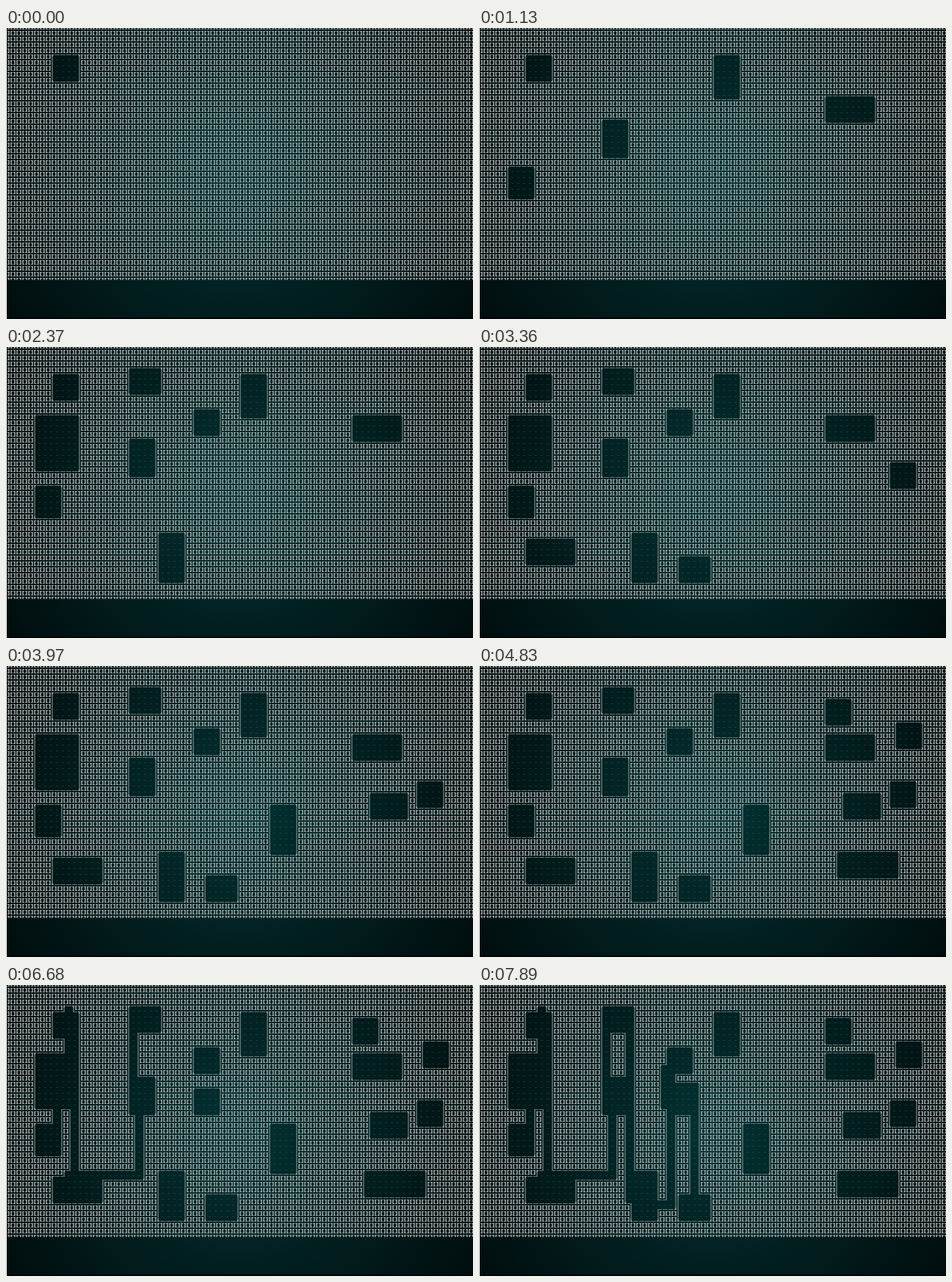
An HTML page with a canvas that plays this animation: 636 px wide and 396 px high, repeating every 8 s.

```html
<!DOCTYPE html>
<html lang="en">
<head>
<meta charset="utf-8">
<title>Dungeon digger</title>
<style>
html, body { margin: 0; width: 100%; height: 100%; overflow: hidden; background: #000508; }
canvas { display: block; }
</style>
</head>
<body>
<canvas id="stage" width="636" height="396"></canvas>
<script>
const ctx = document.getElementById('stage').getContext('2d');
const LOOP = 8000, FIRST = 208, STEP = 307.2;
const COLS = 80, ROWS = 43, CELL = 8, LEFT = 2, TOP = -1;

function room(x, y, w = 4, h = 4) {
  return Array.from({ length: w * h }, (_, i) => [x + i % w, y + Math.floor(i / w)]);
}

// A corridor runs along column x from y1 to y2, then turns towards column x2.
function corridor(x, y1, y2, x2 = x) {
  const cells = [];
  const dy = Math.sign(y2 - y1), dx = Math.sign(x2 - x);
  for (let y = y1; y !== y2; y += dy) cells.push([x, y]);
  for (; x !== x2; x += dx) cells.push([x, y2]);
  return [...cells, [x2, y2]];
}

// One area is dug per step.
const areas = [
  room(8, 5), room(21, 16, 4, 6), room(40, 5, 4, 7), room(59, 12, 8),
  room(5, 24, 4, 5), room(26, 32, 4, 8), room(21, 4, 5), room(5, 12, 7, 9),
  room(32, 11), room(34, 36, 5), room(70, 20), room(8, 33, 8),
  room(45, 24, 4, 8), room(62, 22, 6), room(61, 32, 10), room(59, 6),
  room(71, 10), room(32, 18),
  corridor(8, 21, 23), corridor(10, 4, 11), corridor(11, 9, 32),
  corridor(22, 22, 32, 10), corridor(21, 8, 15), corridor(25, 8, 36),
  corridor(32, 15, 37, 30), corridor(31, 14, 20), corridor(36, 35, 17, 33)
];

function radial(...colors) {
  const g = ctx.createRadialGradient(318, 196, 0, 318, 196, 375);
  colors.forEach((color, i) => g.addColorStop(i / (colors.length - 1), color));
  return g;
}
const ground = radial('#033233', '#021f20', '#010d0d');
const arm = radial('#94a5a6', '#a2a6a5', '#a5a5a5');
const line = radial('#5f7878', '#647371', '#666f6d');

function bar(x, y, w, h, color) {
  ctx.fillStyle = color;
  ctx.fillRect(x, y, w, h);
}

// Double-line box glyph: a line with a neighbour on its side splits into two arms.
function glyph(x, y, n, e, s, w) {
  const upright = (dx, split) => {
    const a = n ? 0 : 2, b = s ? CELL : 6;
    if (!split) return bar(x + dx, y + a, 1.5, b - a, line);
    if (n) bar(x + dx, y, 1.5, 3, arm);
    if (s) bar(x + dx, y + 5, 1.5, 3, arm);
  };
  const level = (dy, split) => {
    const a = w ? 0 : 1.2, b = e ? 7 : 5.8;
    if (!split) return bar(x + a, y + dy, b - a, 1, line);
    if (w) bar(x, y + dy, 2.7, 1, arm);
    if (e) bar(x + 4.3, y + dy, 2.7, 1, arm);
  };
  upright(1.2, w);
  upright(4.3, e);
  level(2, n);
  level(5, s);
}

function draw(count) {
  const key = (c, r) => r * COLS + c;
  const open = new Set(areas.slice(0, count).flat().map(([c, r]) => key(c, r)));
  const solid = (c, r) => !open.has(key(c, r));

  bar(0, 0, 636, 396, '#000508');
  bar(0, 0, 636, 394, ground);
  bar(0, 0, 1, 396, '#fff');

  for (let r = 0; r < ROWS; r++) {
    for (let c = 0; c < COLS; c++) {
      const x = LEFT + c * CELL, y = TOP + r * CELL;
      if (solid(c, r))
        glyph(x, y, solid(c, r - 1), solid(c + 1, r), solid(c, r + 1), solid(c - 1, r));
      else
        bar(x + 2, y + 4, 3, 1, 'rgba(140, 150, 140, 0.2)');
    }
  }
}

const start = performance.now();
let shown = 0;
function frame() {
  const t = (performance.now() - start) % LOOP;
  const count = t < FIRST ? 1 : 2 + Math.floor((t - FIRST) / STEP);
  if (count !== shown) draw(shown = count);
  requestAnimationFrame(frame);
}
frame();
</script>
</body>
</html>
```
